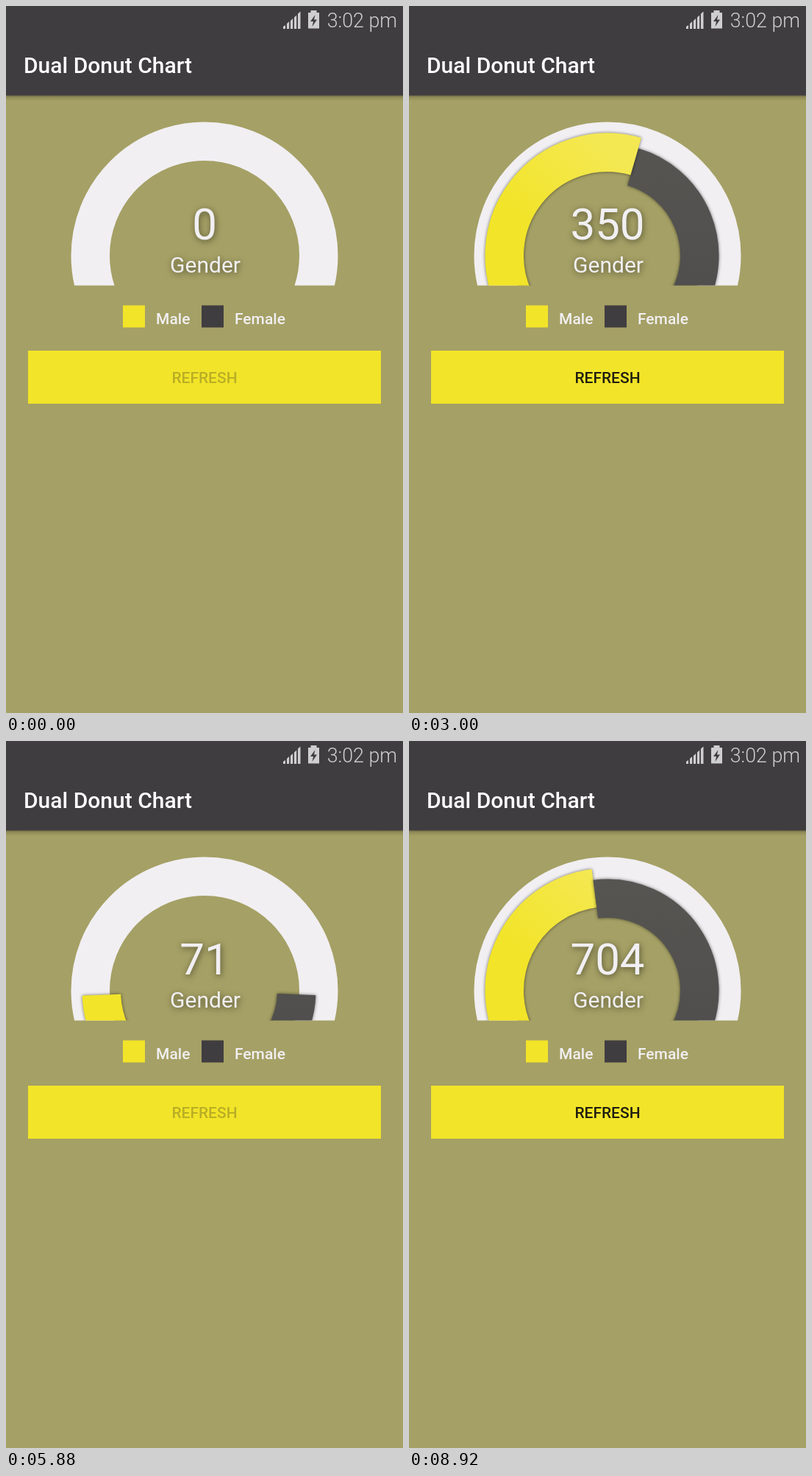
Animation, 540 px wide and 960 px high, one loop 8.96 s. Source, as an HTML page:

```html
<!DOCTYPE html>
<html lang="en">
<head>
<meta charset="utf-8">
<title>Dual Donut Chart</title>
<style>
  html, body { margin: 0; width: 100%; height: 100%; overflow: hidden; background: #a5a065; }
  svg { display: block; width: 540px; height: 960px; font-family: Roboto, "Noto Sans", sans-serif; }
  .medium { font-weight: 500; }
  .ring { fill: none; stroke-width: 52.5; }
  .lifted { filter: drop-shadow(0 0 2px rgba(0, 0, 0, .55)); }
  .glow { filter: drop-shadow(1px 2px 4px rgba(0, 0, 0, .5)); }
</style>
</head>
<body>
<svg viewBox="0 0 540 960">
  <defs>
    <linearGradient id="headerShade" x1="0" y1="0" x2="0" y2="1">
      <stop offset="0" stop-color="#000" stop-opacity=".34"/>
      <stop offset=".4" stop-color="#000" stop-opacity=".12"/>
      <stop offset="1" stop-color="#000" stop-opacity="0"/>
    </linearGradient>
    <linearGradient id="maleFill" gradientUnits="userSpaceOnUse" x1="250" y1="180" x2="150" y2="290">
      <stop offset="0" stop-color="#f4e852"/>
      <stop offset="1" stop-color="#f2e428"/>
    </linearGradient>
    <linearGradient id="femaleFill" gradientUnits="userSpaceOnUse" x1="0" y1="187" x2="0" y2="379">
      <stop offset="0" stop-color="#565551"/>
      <stop offset="1" stop-color="#504f4e"/>
    </linearGradient>
    <clipPath id="chartArea"><rect x="0" y="122" width="540" height="257.5"/></clipPath>
  </defs>

  <rect width="540" height="960" fill="#a5a065"/>
  <rect y="121" width="540" height="8" fill="url(#headerShade)"/>
  <rect width="540" height="121.5" fill="#403d41"/>

  <g fill="#cfced0">
    <path d="M377 31v-3l3-2v5zM382 31v-7l3.2-3v10zM387 31v-11l3.2-3v14zM392 31v-15.500l3.200-3v18.500zM397 31v-20.500l3.500-3v23.500z"/>
    <path d="M414.500 6h8v3h3.500v21.500h-15v-21.500h3.500z"/>
    <path d="M420.500 12l-6.500 9h4l-1.500 7 6.500-9.500h-4z" fill="#403d41"/>
    <text x="532" y="29" font-size="26.800" font-weight="300" text-anchor="end">3:02 pm</text>
  </g>
  <text class="medium" x="24" y="91" font-size="30" fill="#fff">Dual Donut Chart</text>

  <g clip-path="url(#chartArea)">
    <circle class="ring" cx="270" cy="339" r="155.25" stroke="#f1eff2"/>
    <g id="arcs">
      <g class="lifted"><path id="female" class="ring" stroke="url(#femaleFill)"/></g>
      <g class="lifted"><path id="male" class="ring" stroke="url(#maleFill)"/></g>
    </g>
  </g>

  <g fill="#f1eff2" text-anchor="middle">
    <text id="count" class="glow" x="270" y="317" font-size="60">0</text>
    <text class="glow" x="271" y="362" font-size="30">Gender</text>
  </g>

  <rect x="159" y="406.500" width="30" height="30" fill="#f2e428"/>
  <rect x="266" y="406.500" width="30" height="30" fill="#403d41"/>
  <g class="medium" font-size="21" fill="#f1eff2">
    <text x="204" y="432">Male</text>
    <text x="311" y="432">Female</text>
  </g>

  <rect id="button" x="30" y="468" width="480" height="72" fill="#f2e428"/>
  <text id="label" class="medium" x="270" y="512" font-size="21" text-anchor="middle">REFRESH</text>
</svg>

<script>
const LOOP = 8960, STEP = 40, RUN = 2000;
const CX = 270, CY = 339, BASE = 30; // arcs begin 30 degrees below the horizontal
const FIRST = { total: 350, male: 136, female: 104 };
const SECOND = { total: 704, male: 112.6, female: 127.4 };
const RISE_1 = 912, FALL = 4782, RISE_2 = 6817;

const $ = id => document.getElementById(id);
const clamp = x => Math.min(1, Math.max(0, x));
const progress = (t, start, length = RUN) => clamp((t - start) / length);

function overshoot(x) {
  const u = x - 1;
  return u * u * (3 * u + 2) + 1;
}

// side: -1 grows from the left, 1 from the right
function arc(radius, sweep, side) {
  if (sweep < 0.01) return "";
  const point = deg => {
    const a = deg * Math.PI / 180;
    return (CX + side * radius * Math.cos(a)).toFixed(2) + " " + (CY - radius * Math.sin(a)).toFixed(2);
  };
  return `M${point(-BASE)}A${radius} ${radius} 0 0 ${side < 0 ? 1 : 0} ${point(sweep - BASE)}`;
}

function chartAt(t) {
  if (t >= FALL && t < RISE_2) {
    const left = (1 - progress(t, FALL)) ** 2;
    const sweep = FIRST.male * left;
    return { male: sweep, female: sweep, count: FIRST.total * left, femaleOnTop: false };
  }
  const late = t >= RISE_2;
  const data = late ? SECOND : FIRST;
  const p = overshoot(progress(t, late ? RISE_2 : RISE_1));
  return {
    male: data.male * p,
    female: data.female * p,
    count: data.total * Math.min(p, 1),
    femaleOnTop: data.female > data.male
  };
}

function drawButton(t) {
  const enabledAt = t >= RISE_2 ? RISE_2 + RUN : RISE_1 + RUN;
  const enabled = t >= enabledAt && !(t >= FALL && t < RISE_2);
  const lift = enabled ? progress(t, enabledAt, 90) + progress(t, 4680, 100) * (t < FALL ? 1 : 0) : 0;
  $("label").setAttribute("fill", enabled ? "#1f1d11" : "#b9ae25");
  $("button").style.filter = lift
    ? `drop-shadow(0 ${0.7 * lift}px ${0.7 * lift}px rgba(0, 0, 0, .5))` : "none";
}

function draw(time) {
  let t = Math.floor((time % LOOP) / STEP) * STEP;
  if (t > 2040 && t < 2200) t = 2040; // rests at the peak
  const chart = chartAt(t);
  $("male").setAttribute("d", arc(140.25, chart.male, -1));
  $("female").setAttribute("d", arc(125.25, chart.female, 1));
  const top = $(chart.femaleOnTop ? "female" : "male").parentNode;
  if ($("arcs").lastElementChild !== top) $("arcs").append(top);
  $("count").textContent = Math.floor(chart.count + 1e-6);
  drawButton(t);
}

const begin = performance.now();
function tick() {
  draw(performance.now() - begin);
  requestAnimationFrame(tick);
}
tick();
</script>
</body>
</html>
```
